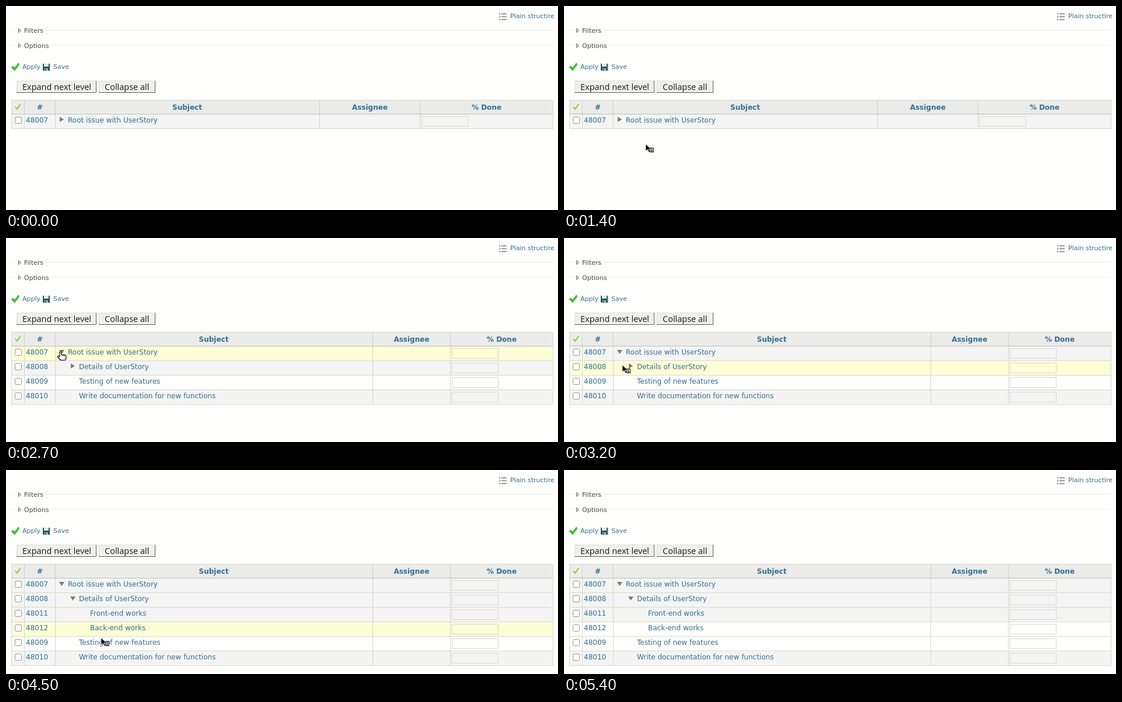
Recreate the animation shown at these times as an HTML page. Size 946 by 350 pixels, loop 5500 ms.

```html
<!DOCTYPE html>
<html lang="en">
<head>
<meta charset="utf-8">
<title>Issue tree</title>
<style>
  html, body { margin: 0; width: 100%; height: 100%; overflow: hidden; background: #fefefc; }
  svg { display: block; width: 946px; height: 350px; font: 12px "DejaVu Sans", sans-serif; }
  text { fill: #34708f; white-space: pre; }
  .small { font-size: 11px; }
  .legend { font-size: 11px; fill: #484844; }
  .head { font-weight: bold; text-anchor: middle; }
  .label { font: 14.5px "Open Sans", sans-serif; fill: #181816; }
  .line { fill: none; stroke: #d9d9d0; }
  .dots { fill: none; stroke: #c4c4be; stroke-dasharray: 2 1; }
  .rule { stroke: #dededa; stroke-dasharray: 1 1; }
  .box { fill: #fefefe; stroke: #96968c; }
  .tri { fill: #7c7c72; }
</style>
</head>
<body>
<svg viewBox="0 0 946 350">
  <g fill="none" stroke="#4c4c4c">
    <path d="M849 13.5h9M849 18.5h9M849 23.5h9"/>
    <path d="M845 13.5h2.5M845 18.5h2.5M845 23.5h2.5" stroke="#8a8a8a" stroke-width="2"/>
  </g>
  <text class="small" x="864" y="21">Plain structire</text>

  <path class="rule" d="M9 41.5h9M65 41.5h873M9 67.5h9M76 67.5h862"/>
  <g fill="#dcdcdc" stroke="#707070">
    <path d="M21.5 38.5v7l4-3.5z"/>
    <path d="M21.5 64.5v7l4-3.5z"/>
  </g>
  <text class="legend" x="31" y="46">Filters</text>
  <text class="legend" x="31" y="72">Options</text>

  <path d="M9 105l3-2 3 3 6-8 2 2-8 11z" fill="#3cc42c" stroke="#2c9a2c" stroke-width=".6"/>
  <text class="small" x="28" y="108">Apply</text>
  <path d="M63 99h12v12H64l-1-1z" fill="#24565e"/>
  <path d="M65 99h8v5h-8z" fill="#e4eee8"/>
  <path d="M66 107h6v4h-6z" fill="#a4bcb8"/>
  <path d="M67 108h2v3h-2z" fill="#24565e"/>
  <text class="small" x="81" y="108">Save</text>

  <g fill="#efefef">
    <path d="M18 128h137v21H18z"/>
    <path d="M159 128h97v21h-97z"/>
  </g>
  <g fill="none">
    <path d="M18.5 148V128.5h136M159.5 148V128.5h96" stroke="#dededc"/>
    <path d="M18 148.5h136.5V128M159 148.5h96.5V128" stroke="#5c5c58"/>
  </g>
  <text class="label" x="28" y="144">Expand next level</text>
  <text class="label" x="169" y="144">Collapse all</text>

  <g id="table"></g>

  <g id="arrow">
    <path d="M0 0v12l3-3 2.500 5 2-1-2.500-4.500h4z" fill="#000" stroke="#fff" stroke-width=".6"/>
    <path d="M7.500 6.500h6v7h-6z" fill="#fff" stroke="#000"/>
    <path d="M9 8.500h3M9 10.500h3M9 12h3" stroke="#000"/>
  </g>
  <path id="hand" d="M-2 9V2q1.500-2 3 0V6.500H6q3 0 3 3V12l-1.500 3.500h-8L-5.500 10q0-2 2-1.500L-2 10M3.500 6.500v2M6 6.500v2"
        fill="#fff" stroke="#000" stroke-width="1.200" stroke-linejoin="round"/>
</svg>
<script>
const LOOP = 5500, STEP = 100, LAG = 50;
const ENTER = 800, LEAVE = 5300;
const TOP = 186, ROW = 25, INDENT = 19;
const $ = id => document.getElementById(id);

const works = [
  { id: 48011, title: 'Front-end works', shaded: true },
  { id: 48012, title: 'Back-end works' }
];
const parts = [
  { id: 48008, title: 'Details of UserStory', shaded: true, click: 3600, children: works },
  { id: 48009, title: 'Testing of new features' },
  { id: 48010, title: 'Write documentation for new functions', shaded: true }
];
const tree = [
  { id: 48007, title: 'Root issue with UserStory', shaded: true, click: 2300, children: parts }
];
const LOAD = 200; // from click to the new rows

// pointer moves: start, end, and where it comes to rest
const moves = [
  [800, 1300, 148, 245], [1300, 1700, 94, 194],
  [3000, 3200, 100, 218], [3200, 3400, 114, 219],
  [4100, 4600, 169, 296], [4700, 5300, 250, 350]
];

const smooth = k => k * k * (3 - 2 * k);
const clamp = k => Math.min(1, Math.max(0, k));
const rect = (x, y, w, h, attrs) => `<rect x="${x}" y="${y}" width="${w}" height="${h}" ${attrs}/>`;
const text = (x, y, s, cls = '') => `<text x="${x}" y="${y}" class="${cls}">${s}</text>`;

function pointerAt(t) {
  let x = 626, y = 349;
  for (const [start, end, toX, toY] of moves) {
    const k = smooth(clamp((t - start) / (end - start)));
    x += (toX - x) * k;
    y += (toY - y) * k;
  }
  return [Math.round(x), Math.round(y)];
}

function visibleRows(t, items = tree, depth = 0) {
  return items.flatMap(item => [
    { ...item, depth, open: t >= item.click },
    ...(t >= item.click + LOAD ? visibleRows(t, item.children, depth + 1) : [])
  ]);
}

const rowAt = y => Math.floor((y - TOP) / ROW);

function overTriangle(rows, [x, y]) {
  const row = rows[rowAt(y)];
  if (!row || !row.children) return false;
  const dx = x - 91 - row.depth * INDENT, dy = (y - TOP) % ROW;
  return dx >= 0 && dx < 10 && dy > 3 && dy < 14;
}

function rowMarkup(row, i, hovered, inputX) {
  const y = TOP + i * ROW, x = 106 + row.depth * INDENT;
  const fill = hovered ? '#fdfdd6' : row.shaded ? '#f4f4f4' : '#fefefc';
  const shape = row.open ? 'M0 2h9L4.500 9z' : 'M1 0l7 4.500L1 9z';
  return rect(9, y, 929, ROW - 1, `fill="${fill}"`) +
    `<path class="line" d="M9 ${y + ROW - .5}h929"/>` +
    rect(15.5, y + 4.5, 11, 11, 'rx="2" class="box"') +
    text(34, y + 14, row.id) +
    (row.children ? `<path class="tri" transform="translate(${x - 15} ${y + 4})" d="${shape}"/>` : '') +
    text(x, y + 14, row.title) +
    rect(inputX + .5, y + 3.5, 79, 17, 'class="line"');
}

function tableMarkup(rows, hover) {
  const [c1, c2] = rows.length > 1 ? [628, 761] : [537, 709];
  const end = TOP + rows.length * ROW - .5;
  return rect(9, 161, 929, 25, 'fill="#ebebea"') +
    rows.map((row, i) => rowMarkup(row, i, i === hover, c2 + 3)).join('') +
    `<path class="dots" d="${[31, 84, c1, c2].map(x => `M${x + .5} 162V${end}`).join('')}"/>` +
    `<path class="line" d="M9.500 161.500h928V${end}H9.500z"/>` +
    '<path d="M9 185.500h929" stroke="#bebeba"/>' +
    '<path d="M16 173l3 4 6-9" fill="none" stroke="#86d42a" stroke-width="2"/>' +
    text(58, 178, '#', 'head') +
    text((84 + c1) / 2, 178, 'Subject', 'head') +
    text((c1 + c2) / 2 + .5, 178, 'Assignee', 'head') +
    text((c2 + 938) / 2, 178, '% Done', 'head');
}

function place(id, at, shown) {
  $(id).style.display = shown ? '' : 'none';
  $(id).setAttribute('transform', `translate(${at})`);
}

function draw(t) {
  const rows = visibleRows(t), at = pointerAt(t);
  const present = t >= ENTER && t < LEAVE;
  const hand = overTriangle(rows, at);
  // the highlight trails the pointer slightly
  const hover = present ? rowAt(pointerAt(t - LAG)[1]) : -1;
  $('table').innerHTML = tableMarkup(rows, hover);
  place('arrow', at, present && !hand);
  place('hand', at, present && hand);
}

let last = -1;
function tick() {
  const t = Math.floor(performance.now() % LOOP / STEP) * STEP;
  if (t !== last) draw(last = t);
  requestAnimationFrame(tick);
}
tick();
</script>
</body>
</html>
```
